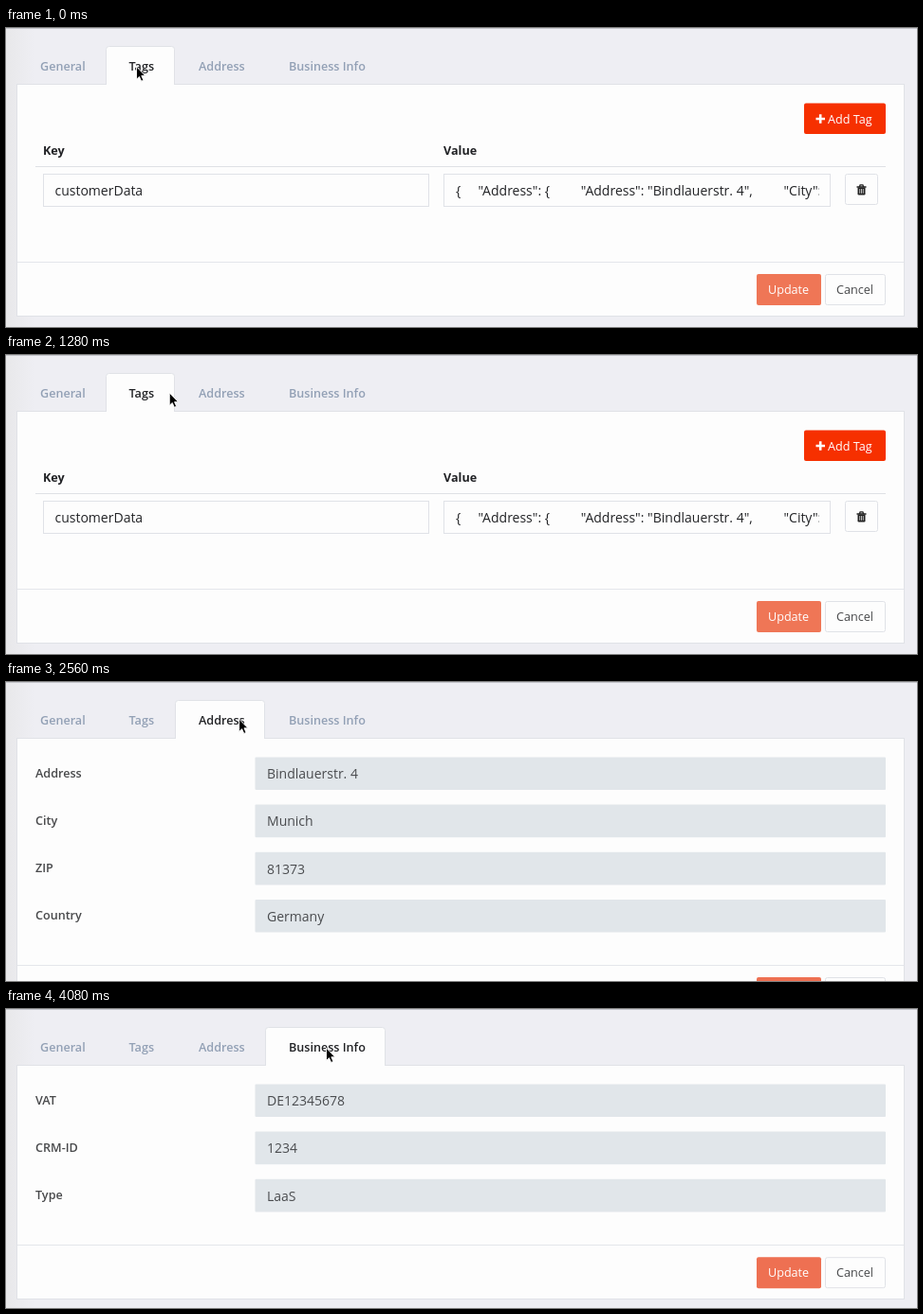
Write an HTML page that moves like this. It is 960 px wide and 316 px high and loops after 4.96 s.

```html
<!DOCTYPE html>
<html lang="en">
<head>
<meta charset="utf-8">
<title>Customer tabs</title>
<style>
  html, body { margin: 0; width: 100%; height: 100%; overflow: hidden; background: #eeeef3; }
  svg { display: block; width: 960px; height: 316px; font: 12.6px "Open Sans", sans-serif; }
  text { white-space: pre; }
  .tab, .label { font-weight: 600; }
  .label { fill: #48494b; }
  .head { font-weight: 700; fill: #202124; }
  .value { font-size: 14px; fill: #4a4c4f; }
  .input { font-size: 14px; fill: #232427; }
  .box { fill: #fdfdfd; stroke: #e0e2e7; }
  .white { fill: #fff; }
</style>
</head>
<body>
<svg viewBox="0 0 960 316">
  <defs>
    <linearGradient id="edge">
      <stop stop-color="#e8e8ea"/><stop offset="1" stop-color="#eeeef3"/>
    </linearGradient>
    <clipPath id="valueClip"><path d="M474 155h383v34h-383z"/></clipPath>
  </defs>
  <path fill="#eeeef3" d="M0 0h960v316H0z"/>
  <path fill="url(#edge)" d="M0 0h30v316H0z"/>
  <path fill="#c4c5cb" d="M0 0h960v1H0z"/>
  <rect id="panel" class="box" x="11.5" y="59.5" width="935"/>
  <path id="under" fill="#f0f0f1"/>
  <g id="panes"></g>
  <g id="footer">
    <rect id="update" x="791" y="260" width="68" height="33" rx="2"/>
    <text class="white" x="803" y="281">Update</text>
    <rect class="box" x="863.5" y="260.5" width="63" height="32" rx="2"/>
    <text class="label" style="font-weight:400" x="875" y="281">Cancel</text>
  </g>
  <path id="tabShape" class="box"/>
  <g id="tabs"></g>
  <path id="pointer" d="M.5.8V14.2L3.5 11.4 5.6 16.2 7.9 15.2 5.8 10.5H9.8Z"
    fill="#000" stroke="#fff" stroke-width=".9"/>
</svg>
<script>
const LOOP = 4960, STEP = 80, FADE = 200;
const $ = id => document.getElementById(id);

const tabs = [
  { name: 'General', x: 36, left: 12, right: 105 },
  { name: 'Tags', x: 129.5, left: 105.5, right: 177.5, line: 247.5, bottom: 304.5 },
  { name: 'Address', x: 203, left: 178.5, right: 272.5, line: 299.5, bottom: 357, shown: 2000, fadeFrom: 1920,
    rows: [['Address', 'Bindlauerstr. 4'], ['City', 'Munich'], ['ZIP', '81373'], ['Country', 'Germany']] },
  { name: 'Business Info', x: 298, left: 273.5, right: 399.5, line: 249.5, bottom: 306.5, shown: 3680, fadeFrom: 3668,
    rows: [['VAT', 'DE12345678'], ['CRM-ID', '1234'], ['Type', 'LaaS']] }
];

const text = (cls, x, y, s) => `<text class="${cls}" x="${x}" y="${y}">${s}</text>`;
const box = (x, y, w, h, r = 0) => `<rect class="box" x="${x}" y="${y}" width="${w}" height="${h}" rx="${r}"/>`;

const formRow = ([label, value], i) => {
  const y = 79.4 + i * 50.2;
  return text('label', 31, y + 21.2, label) +
    `<rect x="262.5" y="${y}" width="664.5" height="34.6" rx="1" fill="#e1e6ea"/>` +
    text('value', 275, y + 22.8, value);
};

const json = '{' + ' '.repeat(5) + '"Address": {' + ' '.repeat(9) +
  '"Address": "Bindlauerstr. 4",' + ' '.repeat(9) + '"City": "Munich"';

const tagTable = `
  <rect x="841" y="79.5" width="86" height="32.5" rx="2" fill="#f63000"/>
  <path d="M853.5 96h9.5M858.2 91.2v9.5" stroke="#fff" stroke-width="2.6"/>
  ${text('white', 866, 100.5, 'Add Tag')}
  ${text('head', 39, 133.5, 'Key')}${text('head', 461, 133.5, 'Value')}
  <path d="M31 146.5h896" stroke="#dfe1e5"/>
  ${box(39.5, 154.5, 406, 34)}${text('input', 51.5, 177, 'customerData')}
  ${box(461.5, 154.5, 407, 34)}
  <g clip-path="url(#valueClip)">${text('input', 474, 177, json)}</g>
  ${box(884.5, 154.5, 34, 32, 2)}
  <path d="M896.5 168h10M899.5 167.5l.6-1.6h2.8l.6 1.6" fill="none" stroke="#222" stroke-width="1.3"/>
  <path d="M897.5 168.5h8v6.7q0 1.3-1.2 1.3h-5.6q-1.2 0-1.2-1.3z" fill="#222"/>
  <path d="M899.7 170v4.8M901.5 170v4.8M903.3 170v4.8" stroke="#fff" stroke-width=".7"/>`;

$('panes').innerHTML = tabs.map(({ line, rows }) => line ? `<g>
  <path fill="#fdfdfd" d="M12 60h934V${line}H12z"/>
  <path stroke="#e4e6eb" d="M12 ${line}h934"/>
  ${rows ? rows.map(formRow).join('') : tagTable}</g>` : '<g></g>').join('');
$('tabs').innerHTML = tabs.map(tab => text('tab', tab.x, 44.6, tab.name)).join('');

const moves = [
  { start: 960, end: 1680, from: [137, 40], to: [225, 37.8] },
  { start: 2320, end: 3120, from: [225, 37.8], to: [337, 40.3] }
];
const clamp = v => Math.min(1, Math.max(0, v));
const ease = u => u < .5 ? 2 * u * u : 1 - 2 * (1 - u) ** 2;

function pointerAt(t) {
  const { start, end, from, to } = moves[t < moves[1].start ? 0 : 1];
  const u = ease(clamp((t - start) / (end - start)));
  return from.map((v, i) => v + (to[i] - v) * u);
}

function draw(now) {
  const t = Math.floor(now % LOOP / STEP) * STEP;
  const active = t < tabs[2].shown ? 1 : t < tabs[3].shown ? 2 : 3;
  const tab = tabs[active];
  const [px, py] = pointerAt(t);

  $('panel').setAttribute('height', tab.bottom - 59.5);
  $('under').setAttribute('d', `M12 60h934V${tab.line + .5}H12z`);
  [...$('panes').children].forEach((pane, i) => {
    pane.style.display = i === active ? '' : 'none';
    pane.style.opacity = tab.shown ? clamp((t - tab.fadeFrom) / FADE) : 1;
  });
  $('footer').setAttribute('transform', `translate(0 ${[0, 0, 52, 2.2][active]})`);
  $('update').setAttribute('fill', active === 1 ? '#ef7656' : '#ee7052');

  $('tabShape').setAttribute('d',
    `M${tab.left} 60V22.5q0-3 3-3H${tab.right - 3}q3 0 3 3V60`);
  [...$('tabs').children].forEach((label, i) => {
    const hover = px >= tabs[i].left && px < tabs[i].right;
    label.setAttribute('fill', i === active ? '#222326' : hover ? '#505156' : '#92a0b5');
  });
  $('pointer').setAttribute('transform', `translate(${px} ${py})`);
}

function loop() {
  draw(performance.now());
  requestAnimationFrame(loop);
}
loop();
</script>
</body>
</html>
```
